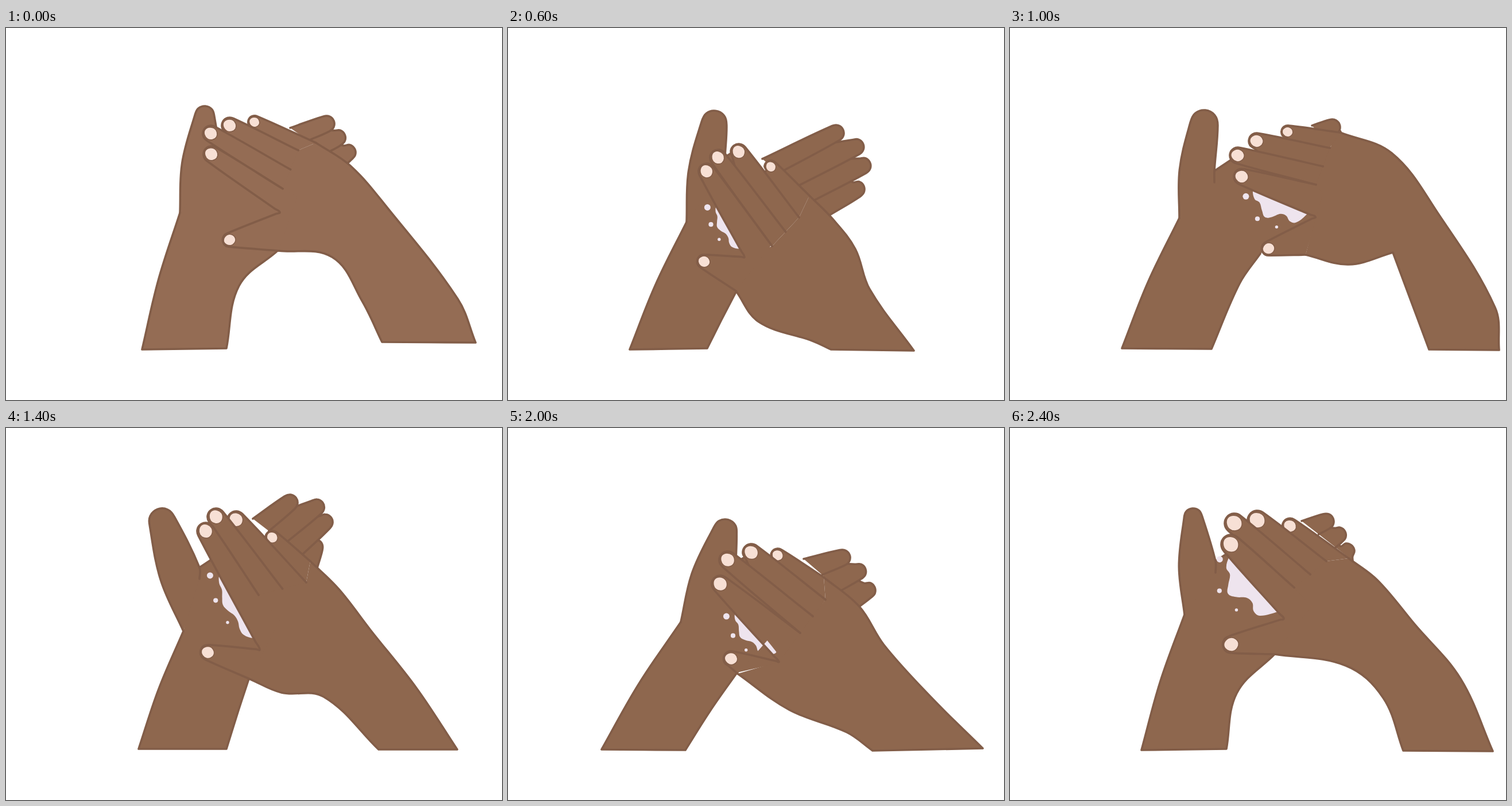
An HTML page for the animation above (2600 ms loop, 864 px wide and 648 px high).

```html
<!DOCTYPE html>
<html lang="en">
<head>
<meta charset="utf-8">
<title>Washing hands</title>
<style>
  html, body { margin: 0; width: 100%; height: 100%; overflow: hidden; background: #fff; }
  svg { display: block; width: 100vw; height: 100vh; }
  svg > g { visibility: hidden; stroke: #825d48; stroke-width: 3.6; stroke-linecap: round; stroke-linejoin: round; }
  svg > g.on { visibility: visible; }
  .line { fill: none; }
  .skin, .foam { stroke: none; }
  .foam { fill: #eee4ee; }
  .nail { fill: #f7e0d5; stroke-width: 1.5; }
</style>
</head>
<body>
<svg id="stage" viewBox="0 0 864 648"></svg>
<script>
// Key points of each pose:
// arm: left end, wrist, thumb, thumb crotch, inner edge, its middle, right end
// rear: lower and upper base, lower and upper fingertip
// outer: right end of the sleeve up to the knuckle; inner: heel of the hand to the left end
// tips: little finger to index; folds: ends of the top and bottom crease; thumb: web, tip
const poses = {
  cover: {
    r: 14, pad: 17, spread: 1, foam: 0,
    arm: '237,560 303,322 346,153 372,215 472,389 406,449 384,558',
    rear: '590,240 495,174 595,217 558,167',
    outer: '818,548 787,472 665,314 600,240 540,200',
    inner: '475,388 568,399 620,475 655,547',
    tips: '433,164 390,170 357,184 358,220', folds: '509,213 482,280', thumb: '477,321 390,369'
  },
  upright: {
    r: 16, pad: 18, spread: 20, foam: 20,
    arm: '243,560 284,340 280,153 336,262 402,427 388,495 374,561',
    rear: '537,264 452,152 568,216 512,126',
    outer: '707,614 645,494 592,385 560,305 497,193',
    inner: '402,428 475,462 503,492 555,576',
    tips: '460,164 404,113 370,106 346,126', folds: '495,252 416,260', thumb: '390,348 305,336'
  },
  tilt: {
    r: 14, pad: 22, spread: 28, foam: 17,
    arm: '212,560 311,338 359,166 378,225 397,460 372,508 347,558',
    rear: '560,326 443,228 607,281 571,183',
    outer: '707,562 630,455 605,385 565,332 525,292',
    inner: '397,458 437,512 530,545 563,560',
    tips: '458,242 402,216 366,226 346,250', folds: '507,330 460,380', thumb: '412,399 342,407'
  },
  level: {
    r: 14, pad: 24, spread: 0, foam: 36,
    arm: '195,558 295,331 338,167 356,249 436,393 400,445 351,559',
    rear: '580,225 526,170 565,200 561,173',
    outer: '852,561 845,487 745,322 665,218 575,182',
    inner: '515,395 590,412 667,391* 730,560',
    tips: '484,181 430,197 397,222 404,259', folds: '557,209 533,273', thumb: '532,329 451,384'
  },
  lean: {
    r: 15, pad: 23, spread: 42, foam: 20,
    arm: '231,559 309,354 272,163 337,243 423,437 403,498 384,559',
    rear: '542,244 430,158 538,208 494,130',
    outer: '786,560 715,453 635,352 580,281 530,232',
    inner: '424,437 480,461 553,468 649,560',
    tips: '464,191 401,160 366,155 348,180', folds: '523,269 440,291', thumb: '442,386 352,391'
  },
  slide: {
    r: 15, pad: 21, spread: 7, foam: 22,
    arm: '163,560 301,338 378,180 397,235 399,426 352,493 309,561',
    rear: '612,311 515,228 626,283 582,226',
    outer: '827,558 738,470 655,378 612,311 550,260',
    inner: '400,428 490,491 590,530 635,562',
    tips: '470,222 424,217 383,230 370,272', folds: '553,299 509,357', thumb: '472,407 389,402'
  },
  arch: {
    r: 17, pad: 16, spread: 4, foam: 45,
    arm: '229,561 304,325 319,156 358,232 461,394 395,462 377,559',
    rear: '597,231 508,162 586,215 550,163',
    outer: '841,563 785,437 705,342 640,265 590,227',
    inner: '461,394 585,414 650,470 685,562',
    tips: '488,171 431,161 391,166 385,203', folds: '551,232 495,278', thumb: '477,332 386,377'
  }
};

const parse = text => text.split(' ').map(word => {
  const [x, y] = word.split(',').map(parseFloat);
  return { x, y, sharp: word.endsWith('*') };
});
for (const pose of Object.values(poses))
  for (const key in pose) if (typeof pose[key] === 'string') pose[key] = parse(pose[key]);

const num = (a, b, t) => a + (b - a) * t;
const mix = (a, b, t) => ({ x: num(a.x, b.x, t), y: num(a.y, b.y, t) });
const move = (p, dx, dy) => ({ x: p.x + dx, y: p.y + dy });
const along = (p, v, k) => move(p, v.x * k, v.y * k);
const sharp = p => ({ ...p, sharp: true });
const side = v => ({ x: -v.y, y: v.x });
const gap = (a, b) => Math.hypot(b.x - a.x, b.y - a.y);
const unit = (a, b) => {
  const d = gap(a, b) || 1;
  return { x: (b.x - a.x) / d, y: (b.y - a.y) / d };
};
const bow = (a, b, k) => along(mix(a, b, 0.5), side(unit(a, b)), k * gap(a, b));

// Pose between a and b, with the sleeve ends of each arm moved sideways.
function blend(a, b, t, armShift, handShift) {
  const pose = {}, shift = { arm: armShift, outer: handShift, inner: handShift };
  for (const key in a)
    pose[key] = typeof a[key] === 'number' ? num(a[key], b[key], t) : a[key].map((p, i) => {
      const q = mix(p, b[key][i], t), low = Math.min(1, Math.max(0, (q.y - 350) / 210));
      return { x: q.x + low * (shift[key] || 0), y: Math.min(q.y, 562), sharp: p.sharp };
    });
  return pose;
}

// Smooth path through the points, broken at sharp ones.
function curve(pts, closed) {
  const n = pts.length;
  const at = i => closed ? pts[(i + n) % n] : pts[Math.max(0, Math.min(n - 1, i))];
  let d = `M${pts[0].x} ${pts[0].y}`;
  for (let i = 0; i < (closed ? n : n - 1); i++) {
    const a = at(i), b = at(i + 1), h = gap(a, b) * 0.36;
    const u = a.sharp ? unit(a, b) : unit(at(i - 1), b);
    const v = b.sharp ? unit(a, b) : unit(a, at(i + 2));
    d += 'C' + [along(a, u, h), along(b, v, -h), b].map(p => `${p.x.toFixed(1)} ${p.y.toFixed(1)}`).join(' ');
  }
  return d + (closed ? 'Z' : '');
}

const line = pts => `<path class="line" d="${curve(pts)}"/>`;

// Outlined skin; the tail closes the fill without a line.
const skin = (pts, tail = []) =>
  `<path class="skin" d="${curve(pts)}${tail.map(p => `L${p.x} ${p.y}`).join('')}Z"/>` + line(pts);

// Rounded end of a finger.
const cap = (tip, dir, r) => [0, 1, 2, 3, 4].map(i => {
  const a = i * Math.PI / 4;
  return along(along(tip, side(dir), r * Math.cos(a)), dir, r * Math.sin(a));
});

function nail(tip, dir, r) {
  const n = side(dir);
  const pts = [along(tip, dir, r * 0.88), along(tip, n, r * 0.78), along(tip, dir, -r * 0.8), along(tip, n, -r * 0.78)];
  return `<path class="nail" d="${curve(pts, true)}"/>`;
}

const aim = (a, b, tip) => unit(mix(a, b, 0.5), tip);

// Overlapping fingers; finger i stands between bases i and i + 1.
function fan(tips, bases, r, nails) {
  return tips.map((tip, i) => {
    const from = bases[i], to = bases[i + 1], dir = aim(from, to, tip), next = tips[i + 1];
    const under = next ? [sharp(mix(next, to, 0.3))] : [];
    const size = nails && i === 0 ? r * 0.8 : r;
    return skin([from, ...cap(tip, dir, size), ...under, to]) + (nails ? nail(tip, dir, size) : '');
  }).join('');
}

function rearFingers({ rear: [low, high, first, last], spread }) {
  const n = spread > 12 ? 4 : 3, out = side(unit(first, last)), tips = [], bases = [];
  for (let i = 0; i <= n; i++) bases.push(mix(low, high, i / n));
  for (let i = 0; i < n; i++) {
    const t = i / (n - 1);
    tips.push(along(mix(first, last, t), out, spread * Math.sin(Math.PI * t)));
  }
  return fan(tips, bases, 14, false);
}

function arm({ arm: [left, wrist, tip, crotch, edge, middle, right], thumb: [web], folds, pad }) {
  const palm = move(crotch, 30, -20), round = cap(tip, aim(crotch, wrist, tip), pad);
  return skin([wrist, bow(wrist, left, 0.02), sharp(left), sharp(right), middle, edge],
      [move(web, 10, 0), folds[0], palm, crotch]) +
    line([crotch, palm]) +
    skin([move(crotch, 0, 20), crotch, ...round, bow(round[4], wrist, 0.055), wrist]);
}

// Lather with a wavy rim along the lower edge of the index finger.
function lather({ tips, thumb: [web], foam, r }) {
  if (!foam) return '';
  const dir = unit(tips[3], web), out = side(dir), base = along(tips[3], out, r);
  const start = mix(base, web, 0.55 - foam * 0.01), end = mix(base, web, 0.9);
  const at = (t, k) => along(mix(start, end, t), out, k);
  const rim = [at(0, -8), at(1, -8)];
  for (let i = 10; i >= 0; i--) {
    const t = i / 10;
    rim.push(at(t, foam * (0.75 + 0.25 * Math.cos(t * 13 + 1)) * Math.sin(Math.PI * t) ** 0.4));
  }
  const dots = [0, 1, 2].map(i => {
    const p = at(i * 0.35 - 0.05, i ? foam + 7 : 15);
    return `<circle class="foam" cx="${p.x}" cy="${p.y}" r="${5.5 - i * 1.4}"/>`;
  });
  return `<path class="foam" d="${curve(rim, true)}"/>` + dots.join('');
}

function frontHand({ outer, inner, tips, folds, thumb: [web, tip], r }) {
  const knuckle = outer[4], heel = inner[0], [top, bottom] = folds;
  const [right, ...rise] = outer, left = inner[3];
  const index = tips[3], dir = aim(bottom, web, index), thumbDir = aim(web, heel, tip);
  const round = cap(index, dir, r), thumbRound = cap(tip, thumbDir, r * 0.9);
  const body = [...rise.reverse(), sharp(right), sharp(left), inner[2], inner[1], heel];
  const front = [bottom, ...round, mix(web, round[4], 0.07), web, mix(web, thumbRound[0], 0.07), ...thumbRound, heel];
  return skin(body, [web, bottom, top]) +
    fan(tips.slice(0, 3), [knuckle, top, mix(top, bottom, 0.5), bottom], r, true) +
    skin(front, [mix(knuckle, heel, 0.5)]) +
    nail(index, dir, r) + nail(tip, thumbDir, r * 0.9);
}

const { cover, upright, tilt, level, lean, slide, arch } = poses;
const steps = [
  cover, upright, blend(upright, tilt, 0.5, 6, 41),
  tilt, blend(lean, upright, 0.5, 0, 0),
  level, blend(level, arch, 0.5, 14, 14),
  lean, blend(lean, tilt, 0.3, 4, -16), blend(tilt, slide, 0.3, 6, 2),
  slide, blend(slide, arch, 0.6, -9, 25), arch
];

const stage = document.getElementById('stage');
stage.innerHTML = steps.map((pose, i) =>
  `<g fill="${i < 3 ? '#946c54' : '#8e674e'}">` +
  rearFingers(pose) + arm(pose) + lather(pose) + frontHand(pose) + '</g>').join('');
const groups = [...stage.children];

function tick() {
  const now = Math.floor(performance.now() / 200) % steps.length;
  groups.forEach((g, i) => g.classList.toggle('on', i === now));
  requestAnimationFrame(tick);
}
tick();
</script>
</body>
</html>
```
